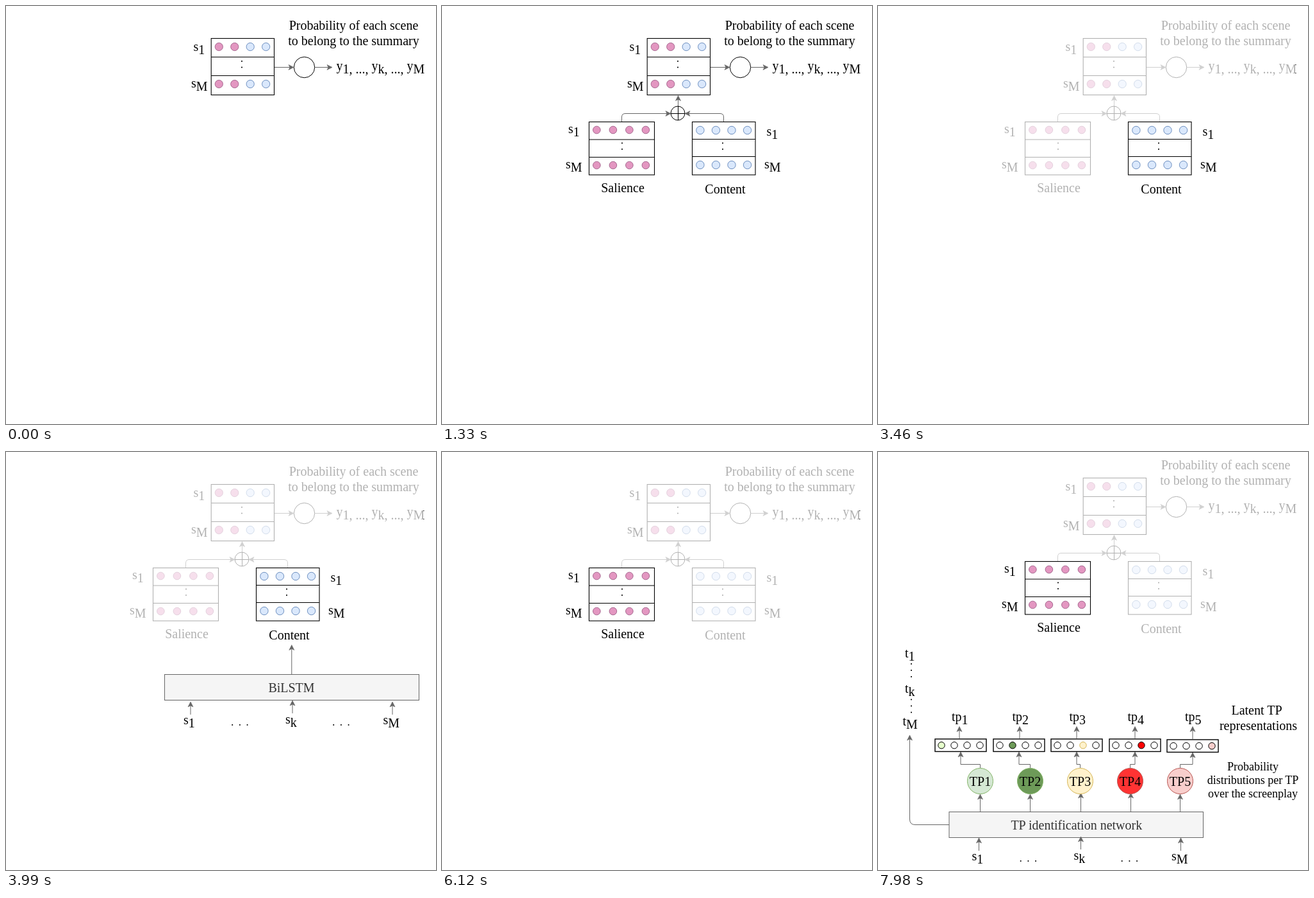
Animation of 671 by 651 pixels, one loop 8 s. Source, as an HTML page:

```html
<!DOCTYPE html>
<html lang="en">
<head>
<meta charset="utf-8">
<title>Scene summary network</title>
<style>
  html, body { margin: 0; width: 100%; height: 100%; overflow: hidden; background: #fff; }
  svg { display: block; }
  text { font: 20px "Liberation Serif", "Times New Roman", serif; }
</style>
</head>
<body>
<svg id="stage" width="671" height="651" viewBox="0 0 671 651">
  <defs><clipPath id="edge"><rect x="651" y="80" width="20" height="40"/></clipPath></defs>
</svg>
<script>
(() => {
const NS = 'http://www.w3.org/2000/svg';
const stage = document.getElementById('stage');

function add(parent, tag, attrs = {}, content) {
  const el = document.createElementNS(NS, tag);
  for (const key in attrs) el.setAttribute(key, attrs[key]);
  if (content) el.textContent = content;
  return parent.appendChild(el);
}
const group = (parent = stage) => add(parent, 'g');

const PINK = ['#e397c1', '#a6678f'];
const BLUE = ['#dae8fc', '#6c8ebf'];
const PLAIN = ['#fff', '#000'];
const GREY = '#666';

const rect = (g, x, y, w, h, fill = '#fff', stroke = '#000', width = 1.1) =>
  add(g, 'rect', { x, y, width: w, height: h, fill, stroke, 'stroke-width': width });
const disc = (g, cx, cy, r, [fill, stroke]) =>
  add(g, 'circle', { cx, cy, r, fill, stroke });
const line = (g, d, stroke = '#000') => add(g, 'path', { d, fill: 'none', stroke });
const dots = (g, x, y, n, dx, dy) => {
  for (let i = 0; i < n; i++) add(g, 'circle', { cx: x + i * dx, cy: y + i * dy, r: 1.05 });
};
const words = (g, x, y, str, size = 20, fill = '#000') =>
  add(g, 'text', { x, y, fill, 'text-anchor': 'middle', style: `font-size:${size}px` }, str);

// Pairs of plain and lowered text, e.g. 's', '1'.
function label(g, x, y, ...parts) {
  const t = add(g, 'text', { x, y });
  parts.forEach((p, i) => add(t, 'tspan', i ? { dy: i % 2 ? 5 : -5 } : {}, p));
}

// Line along d that ends in an arrowhead at (x, y), turned by angle.
function arrow(g, d, x, y, angle) {
  line(g, d, GREY);
  add(g, 'path', {
    d: 'M0 0L-8 4L-6 0L-8 -4Z', fill: GREY, stroke: GREY, 'stroke-width': 0.6,
    transform: `translate(${x} ${y}) rotate(${angle})`
  });
}
const arrowUp = (g, x, from, to) => arrow(g, `M${x} ${from}V${to + 5}`, x, to, -90);

// Three-row table with four discs in the first and last row.
function table(g, box, rows, cx, step, cy, r, colours) {
  const [x, y, w, h] = box;
  rect(g, x, y, w, h);
  rows.forEach(v => line(g, `M${x} ${v}h${w}`));
  cy.forEach(v => colours.forEach((c, i) => disc(g, cx + i * step, v, r, c)));
}

// Scene inputs s1 ... sk ... sM below a network bar.
function inputs(g, x, y) {
  [[0, 0], [159, -2], [315, 0]].forEach(([dx, dy]) => arrowUp(g, x + dx, y + 20 + dy, y + dy));
  label(g, x - 11, y + 35, 's', '1');
  label(g, x + 148, y + 33.5, 's', 'k');
  label(g, x + 300.5, y + 35, 's', 'M');
  dots(g, x + 65.2, y + 36, 3, 11.7, 0);
  dots(g, x + 223.2, y + 36, 3, 11.7, 0);
}

const scores = ['y', '1, ..., ', 'y', 'k, ..., ', 'y', 'M'];

// Upper diagram
const upper = group();
const head = group(upper);
words(head, 542.5, 37, 'Probability of each scene');
words(head, 542.5, 61, 'to belong to the summary');
table(head, [320.2, 50.5, 98.3, 88], [79.5, 108.5], 332.3, 24.45, [63.5, 121.5], 6.1,
  [PINK, PINK, BLUE, BLUE]);
dots(head, 368, 86, 2, 0, 9.5);
label(head, 292.5, 70, 's', '1');
label(head, 289, 127, 's', 'M');
disc(head, 465.5, 95.5, 16.2, PLAIN);
arrow(head, 'M419 95.5H443', 449, 95.5, 0);
arrow(head, 'M482 95.5H503', 509, 95.5, 0);
label(head, 515.5, 100, ...scores);

const merge = group(upper);
arrowUp(merge, 368.5, 156, 139.5);
arrow(merge, 'M280.5 180V173Q280.5 167.5 286 167.5H351', 357, 167.5, 0);
arrow(merge, 'M439.5 180V173Q439.5 167.5 434 167.5H385', 379, 167.5, 180);
disc(merge, 368, 167, 10.9, PLAIN);
line(merge, 'M357 167.5h22M368.5 156v22');

const salience = group(upper);
table(salience, [229.5, 180.5, 102, 82.5], [208, 235.5], 241.4, 25.5, [193, 248], 5.8,
  Array(4).fill(PINK));
dots(salience, 281, 213.5, 2, 0, 9.5);
label(salience, 197, 198, 's', '1');
label(salience, 193, 252.5, 's', 'M');
words(salience, 282, 290, 'Salience');

const content = group(upper);
table(content, [390.5, 180.5, 98.5, 82.5], [207.5, 234.5], 402.9, 24.55, [193.5, 247.5], 6.2,
  Array(4).fill(BLUE));
dots(content, 438, 213.5, 2, 0, 9.5);
label(content, 506.5, 201.5, 's', '1');
label(content, 503, 253, 's', 'M');
words(content, 442, 292, 'Content');

// Right tip of the last score, which stays black while the rest fades.
const tip = add(stage, 'g', { 'clip-path': 'url(#edge)' });
label(tip, 515.5, 100, ...scores);

// Content encoder
const encoder = group();
rect(encoder, 247.5, 346.5, 397, 40, '#f5f5f5', GREY, 1);
words(encoder, 445.5, 374, 'BiLSTM', 20, '#333');
arrowUp(encoder, 445.8, 346, 300.5);
inputs(encoder, 288, 389);

// Turning point network
const network = group();
rect(network, 111, 560.5, 396.5, 40, '#f5f5f5', GREY, 1);
words(network, 309.8, 588, 'TP identification network', 20, '#333');
inputs(network, 157.5, 601);
arrow(network, 'M111 580.5H58Q49.5 580.5 49.5 572V447', 49.5, 441, -90);
label(network, 42, 320, 't', '1');
label(network, 42, 374.5, 't', 'k');
label(network, 38.5, 425.5, 't', 'M');
dots(network, 52, 330, 3, 0, 10);
dots(network, 52, 385.5, 3, 0, 10);
words(network, 585, 495.5, 'Probability', 18);
words(network, 585, 516.5, 'distributions per TP', 18);
words(network, 585, 537.5, 'over the screenplay', 18);

const latent = group();
words(latent, 591, 408.5, 'Latent TP');
words(latent, 593.5, 432.5, 'representations');

// fill, stroke, cell fill, marked cell, box x, box y, label x, label arrow x
const points = [
  ['#d5e8d4', '#82b366', '#e6ffcc', 0, 89, 447, 115, 127],
  ['#6d9a58', '#82b366', '#6d9a58', 1, 180, 447, 209.5, 221],
  ['#fff2cc', '#d6b656', '#fff2cc', 2, 270, 447, 298.5, 310],
  ['#ff3333', '#b85450', '#ff0000', 2, 361, 447, 389.5, 401],
  ['#f8cecc', '#b85450', '#f8cecc', 3, 451, 448, 479, 491]
];
points.forEach(([fill, stroke, mark, cell, bx, by, lx, ax], i) => {
  const x = 159.5 + i * 78;
  arrowUp(network, x + (i === 2 || i === 3 ? 1 : 0), 560, i === 2 || i === 3 ? 531 : 533);
  disc(network, x, 512.5, 20, [fill, stroke]);
  words(network, x, 519.5, 'TP' + (i + 1));

  const mid = bx + 40;
  arrow(latent, `M${x} 492V486.5H${mid}V473`, mid, by + 20, -90);
  rect(latent, bx, by, 80, 19.5, '#fff', '#000', 1.4);
  for (let k = 0; k < 4; k++) {
    const edge = k === cell && i === 2 ? stroke : '#000';
    disc(latent, bx + 10 + k * 20, by + 9.8, 5.2, [k === cell ? mark : '#fff', edge]);
  }
  arrowUp(latent, ax, by - 1, 427.5);
  label(latent, lx, i === 3 ? 418.5 : 419, 'tp', String(i + 1));
});

const FADED = 0.3;
const STEP = 1330, LOOP = 8000;
// Opacity per step: one value for each of the seven steps.
const tracks = [
  [head, [1, 1, FADED, FADED, FADED, FADED, FADED]],
  [merge, [0, 1, FADED, FADED, FADED, FADED, FADED]],
  [salience, [0, 1, FADED, FADED, 1, 1, 1]],
  [content, [0, 1, 1, 1, FADED, FADED, FADED]],
  [tip, [0, 0, 1, 1, 1, 0, 0]],
  [encoder, [0, 0, 0, 1, 0, 0, 0]],
  [network, [0, 0, 0, 0, 0, 1, 1]],
  [latent, [0, 0, 0, 0, 0, 0, 1]]
];

let shown = -1;
const start = performance.now();
function draw() {
  const time = Math.max(0, performance.now() - start) % LOOP;
  const step = Math.min(6, Math.floor(time / STEP));
  if (step !== shown) {
    shown = step;
    tracks.forEach(([g, values]) => g.setAttribute('opacity', values[step]));
    upper.setAttribute('transform', `translate(0 ${step < 5 ? 0 : -10})`);
  }
  requestAnimationFrame(draw);
}
draw();
})();
</script>
</body>
</html>
```
